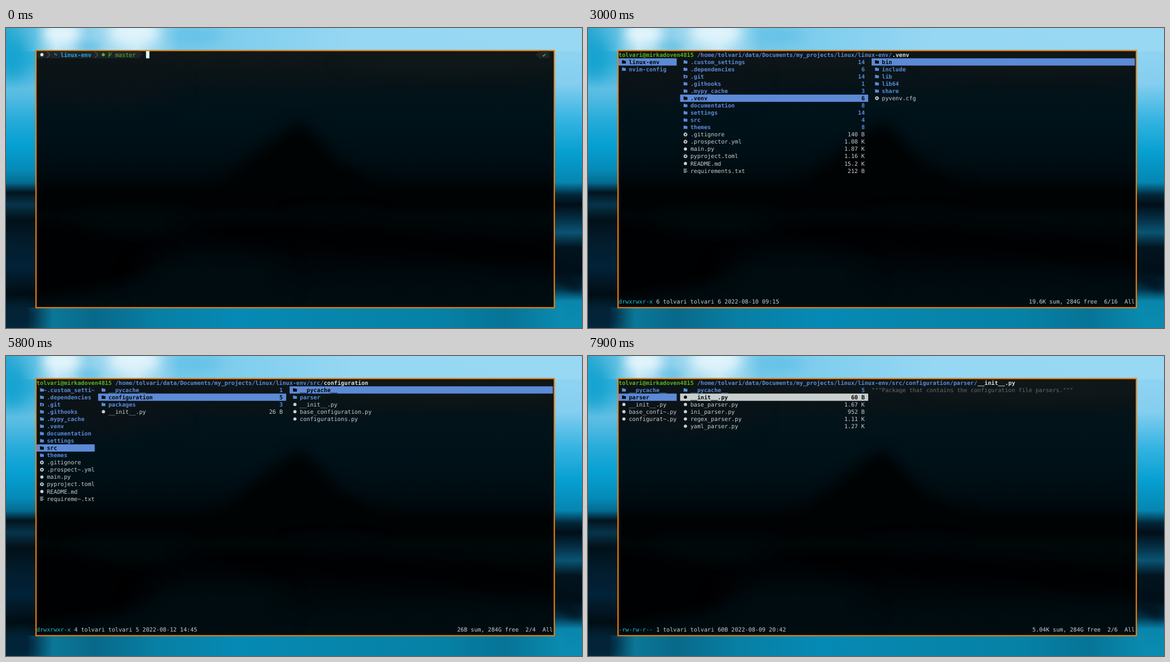
Animation, 1036 px wide and 540 px high, one loop 8000 ms. Source, as an HTML page with a canvas:

```html
<!DOCTYPE html>
<html lang="en">
<head>
<meta charset="utf-8">
<title>Terminal file manager</title>
<style>
html, body { margin: 0; width: 100%; height: 100%; overflow: hidden; background: #000; }
canvas { display: block; }
</style>
</head>
<body>
<canvas id="stage" width="1036" height="540"></canvas>
<script>
const W = 1036, H = 540, LOOP = 8000;
const LEFT = 55, TOP = 41.5, CELL = 6.15, ROW = 13.06;
const BLUE = '#5d8ad6', LIGHT = '#c9cfcf', GREEN = '#5cb31c', YELLOW = '#e9f014', RED = '#c91414',
  CYAN = '#1cc3d2', ORANGE = '#e8800f', INK = '#000507', SEGMENT = '#1d2527';
const USER = 'tolvari', HOST = 'mirkadoven4815';
const HOME = `/home/${USER}/data/Documents/my_projects/linux/linux-env/`;

const ctx = document.getElementById('stage').getContext('2d');
const colX = col => LEFT + col * CELL;
const rowY = row => TOP + row * ROW;

// ---- Blurred wallpaper and the translucent window, painted once ----
function paintBackdrop() {
  const canvas = document.createElement('canvas');
  canvas.width = W;
  canvas.height = H;
  const g = canvas.getContext('2d');
  const fade = (x, y, w, h, stops, across) => {
    const grad = across ? g.createLinearGradient(x, 0, x + w, 0) : g.createLinearGradient(0, y, 0, y + h);
    stops.split(' ').forEach(s => {
      const [at, color] = s.split(':');
      grad.addColorStop((at - (across ? x : y)) / (across ? w : h), color);
    });
    g.fillStyle = grad;
    g.fillRect(x, y, w, h);
  };
  const blob = (x, y, rx, ry, color, blur, turn = 0) => {
    g.filter = `blur(${blur}px)`;
    g.fillStyle = color;
    g.beginPath();
    g.ellipse(x, y, rx, ry, turn, 0, 7);
    g.fill();
    g.filter = 'none';
  };
  const shape = (points, color, blur) => {
    g.filter = `blur(${blur}px)`;
    g.fillStyle = color;
    g.beginPath();
    points.forEach(p => g.lineTo(...p));
    g.fill();
    g.filter = 'none';
  };

  fade(0, 0, 518, H, '0:#45b5dc 60:#36b0da 110:#62c0e5 165:#27abd9 210:#06a0d2 255:#058bb8 278:#046c92 296:#02141f 318:#06344a 345:#021019 385:#021c2c 430:#022238 480:#010d13 505:#02202f 540:#032c42');
  fade(518, 0, 518, H, '0:#98d7f2 100:#84cef0 165:#35b4e2 225:#069fd0 278:#0586b1 300:#02273a 318:#010e17 342:#042d42 368:#0a5473 395:#02141f 440:#010f19 470:#02344c 492:#0a86ac 540:#0a8cb2');
  fade(0, 0, W, 42, '0:#2ba9d3 50:#5fc0e2 90:#c4e8f6 150:#8fd1ec 235:#c4e8f6 310:#74c8ea 420:#80ceee 620:#96d7f3 1036:#98d8f3', true);
  blob(12, 55, 28, 40, '#16a3d0', 14);
  blob(100, 10, 32, 17, '#e2f4fb', 9);
  blob(230, 8, 45, 22, '#dff3fb', 10);
  blob(150, 34, 22, 9, '#66c1e3', 8);
  blob(345, 14, 45, 10, '#5fc0e6', 10);
  fade(40, 503, 960, 37, '40:#04364f 85:#0b7798 160:#08698a 270:#087fa4 420:#058ab5 600:#0785ab 780:#0681a6 900:#067496 1000:#0a8bb0', true);
  blob(20, 520, 34, 22, '#032338', 12);
  blob(1010, 455, 30, 10, '#01121d', 8, .5);

  g.save();
  g.beginPath();
  g.rect(54, 41, 932, 462);
  g.clip();
  fade(54, 41, 932, 462, '41:#101719 75:#0b1417 120:#03131a 175:#001219 235:#000e14 270:#00090d 292:#000304 318:#000304 340:#00080a 390:#000406 420:#000609 465:#000b0f 503:#020d11');
  blob(170, 100, 130, 32, '#0c1317', 22);
  blob(800, 60, 200, 16, '#10181a', 14);
  shape([[370, 292], [430, 240], [500, 185], [528, 168], [555, 190], [600, 240], [690, 292]], '#000304', 12);
  blob(230, 345, 120, 20, '#00090b', 12);
  blob(590, 333, 90, 12, '#00070a', 9);
  shape([[300, 350], [500, 348], [990, 390], [990, 428], [700, 405], [400, 378]], '#000102', 10);
  shape([[40, 340], [110, 355], [300, 415], [280, 435], [170, 470], [40, 490]], '#000102', 12);
  blob(370, 450, 130, 38, '#000d11', 22);
  g.restore();

  g.strokeStyle = ORANGE;
  g.lineWidth = 2.2;
  g.strokeRect(54, 40.6, 932.2, 462.8);
  return canvas;
}

// ---- Text grid helpers ----
function text(str, col, row, color, bold) {
  ctx.font = `${bold ? 'bold ' : ''}${CELL / 0.60205}px "DejaVu Sans Mono", monospace`;
  ctx.fillStyle = color;
  ctx.fillText(str, colX(col), rowY(row) + 10.1);
}

function bar(from, to, row, color) {
  ctx.fillStyle = color;
  ctx.fillRect(colX(from), rowY(row), (to - from) * CELL, ROW);
}

function dot(x, y, r, color) {
  ctx.fillStyle = color;
  ctx.beginPath();
  ctx.arc(x, y, r, 0, 7);
  ctx.fill();
}

function line(points, color, width = 1) {
  ctx.strokeStyle = color;
  ctx.lineWidth = width;
  ctx.beginPath();
  points.forEach(p => ctx.lineTo(...p));
  ctx.stroke();
}

function triangle(points, color) {
  ctx.fillStyle = color;
  ctx.beginPath();
  points.forEach(p => ctx.lineTo(...p));
  ctx.fill();
}

// ---- Icons, centred on (x, y) ----
const icons = {
  folder(x, y, color) {
    ctx.fillStyle = color;
    ctx.fillRect(x - 3.3, y - 2.9, 3.2, 2);
    ctx.fillRect(x - 3.3, y - 2, 6.8, 5);
  },
  repo(x, y, color) {
    icons.folder(x, y, color);
    dot(x + .2, y + .5, 1.2, INK);
  },
  gear(x, y, color) {
    ctx.strokeStyle = color;
    for (const [r, width, dash] of [[2.1, 1.7, []], [3.1, 1.1, [1.4, 1.03]]]) {
      ctx.lineWidth = width;
      ctx.setLineDash(dash);
      ctx.beginPath();
      ctx.arc(x, y, r, 0, 2 * Math.PI);
      ctx.stroke();
    }
    ctx.setLineDash([]);
  },
  disc(x, y, color) {
    dot(x, y, 2.9, color);
  },
  lines(x, y, color) {
    [6, 4.5, 7, 5].forEach((w, i) => line([[x - 3.2, y - 3 + i * 2], [x - 3.2 + w, y - 3 + i * 2]], color));
  },
  picture(x, y, color) {
    ctx.strokeStyle = color;
    ctx.lineWidth = 1;
    ctx.strokeRect(x - 2.8, y - 2.6, 4.6, 3.4);
    line([[x - 1, y + 2.6], [x + 3.2, y + 2.6], [x + 3.2, y - .6]], color);
  },
  shell(x, y, color) {
    ctx.fillStyle = color;
    ctx.fillRect(x - 3.3, y - 3, 6.8, 6);
    line([[x - 2, y - 1.3], [x - .7, y], [x - 2, y + 1.3]], INK, .8);
  },
  stack(x, y, color) {
    ctx.fillStyle = color;
    ctx.fillRect(x - 3.3, y - 3.3, 6.6, 1.2);
    ctx.fillRect(x - 3.3, y - 1.6, 6.6, 4.8);
  }
};

const byExtension = { py: 'disc', pyc: 'disc', md: 'disc', txt: 'lines', png: 'picture', gif: 'picture', sh: 'shell', deb: 'stack' };
const colorOf = { folder: BLUE, repo: BLUE, picture: YELLOW, shell: GREEN, stack: RED };

// ---- Directory listings: "name/=count" for folders, "name=size" for files ----
const listing = str => str.split(',').map(item => {
  const [raw, size = ''] = item.split('=');
  const dir = raw.endsWith('/'), name = raw.replace('/', '');
  const icon = name === '.git' ? 'repo' : dir ? 'folder' : byExtension[name.split('.').pop()] || 'gear';
  return { name, dir, size, icon, color: colorOf[icon] || LIGHT, bold: dir || icon === 'shell' };
});
const compiled = names => listing(names.split(',').map(n => n + '.cpython-38.pyc').join());

const projects = listing('linux-env/,nvim-config/');
const root = listing('.custom_settings/=14,.dependencies/=6,.git/=14,.githooks/=1,.mypy_cache/=3,.venv/=6,documentation/=8,settings/=14,src/=4,themes/=8,.gitignore=140 B,.prospector.yml=1.08 K,main.py=1.87 K,pyproject.toml=1.16 K,README.md=15.2 K,requirements.txt=212 B');
const src = listing('__pycache__/=1,configuration/=5,packages/=3,__init__.py=26 B');
const config = listing('__pycache__/=3,parser/=6,__init__.py=58 B,base_configuration.py=1.21 K,configurations.py=2.79 K');
const parser = listing('__pycache__/=5,__init__.py=60 B,base_parser.py=1.67 K,ini_parser.py=952 B,regex_parser.py=1.11 K,yaml_parser.py=1.27 K');
const settings = listing('bat/,dunst/,fonts/,fzf/,git/,i3/,nvim/,p10k/,picom/,ranger/,rofi/,tmux/,vim/,zsh/');

const inRoot = { path: '', list: root, parent: projects, at: 0, sum: '19.6K' };
const inSrc = { path: 'src/', list: src, parent: root, at: 8, sum: '26B' };
const inConfig = { path: 'src/configuration/', list: config, parent: src, at: 1, sum: '4.06K' };
const inParser = { path: 'src/configuration/parser/', list: parser, parent: config, at: 1, sum: '5.04K' };

// start, folder, selected row, hard links, date, preview
const views = [
  [1400, inRoot, 0, 16, '2022-08-19 21:02', []],
  [1500, inRoot, 0, 16, '2022-08-19 21:02', settings],
  [2300, inRoot, 1, 6, '2022-08-13 00:31', listing('albert/,fonts/,logs/,powerlevel10k/,finder.sh,vscode-latest.deb')],
  [3000, inRoot, 5, 6, '2022-08-10 09:15', listing('bin/,include/,lib/,lib64/,share/,pyvenv.cfg')],
  [3900, inRoot, 6, 3, '2022-08-19 21:02', listing('themes/,fzf_preview.gif,i3.png,i3lock.gif,p10k_truncate_path.png,themes.gif,tty-clock.gif,vscode.png')],
  [4000, inRoot, 7, 16, '2022-08-19 20:58', settings],
  [4800, inRoot, 8, 5, '2022-08-12 14:45', src],
  [4900, inSrc, 0, 2, '2022-08-18 11:05', compiled('__init__')],
  [5800, inSrc, 1, 4, '2022-08-12 14:45', config],
  [6200, inConfig, 0, 2, '2022-08-18 11:05', compiled('__init__,base_configuration,configurations')],
  [6700, inConfig, 1, 3, '2022-08-12 14:45', parser],
  [6900, inParser, 0, 2, '2022-08-18 11:05', compiled('__init__,base_parser,ini_parser,regex_parser,yaml_parser')],
  [7900, inParser, 1, 1, '2022-08-09 20:42', '"""Package that contains the configuration file parsers."""']
];

function shorten(item, width) {
  if (item.name.length <= width) return item.name;
  const ext = item.dir ? '' : item.name.slice(item.name.lastIndexOf('.'));
  return item.name.slice(0, width - 1 - ext.length) + '~' + ext;
}

function drawList(list, from, to, selected, { width = 60, sizes = false, boldFile = false } = {}) {
  list.forEach((item, i) => {
    const row = i + 1, picked = i === selected;
    const color = picked ? INK : item.color, bold = item.bold || (picked && boldFile);
    if (picked) bar(from, to, row, item.color);
    icons[item.icon](colX(from + 1) + 3.4, rowY(row) + 6.5, color);
    if (item.dir && item.name.length > width) text('~', from + 2, row, color, bold);
    text(shorten(item, width), from + 3, row, color, bold);
    if (sizes) text(item.size, to - 1 - item.size.length, row, color, bold);
  });
}

function drawManager([, folder, selected, links, date, preview]) {
  const item = folder.list[selected], path = HOME + folder.path, who = `${USER}@${HOST}`;
  text(who, 0, 0, GREEN, true);
  text(path, who.length + 1, 0, BLUE, true);
  text(item.name, who.length + 1 + path.length, 0, '#dce1e1', true);

  drawList(folder.parent, 0, 17, folder.at, { width: 14, boldFile: true });
  drawList(folder.list, 18, 73, selected, { sizes: true, boldFile: true });
  if (typeof preview === 'string') text(preview, 74, 1, '#666b6c');
  else drawList(preview, 74, 151, 0);

  text(item.dir ? 'drwxrwxr-x' : '-rw-rw-r--', 0, 34, CYAN);
  text(`${links} ${USER} ${USER} ${item.size.replace(' ', '')} ${date}`, 11, 34, LIGHT);
  const info = `${folder.sum} sum, 284G free  ${selected + 1}/${folder.list.length}  All`;
  text(info, 151 - info.length, 34, LIGHT);
}

function drawPrompt(typed) {
  const top = rowY(0), mid = top + 6.5, bottom = top + ROW;
  bar(0, 30, 0, SEGMENT);
  triangle([[colX(30), top], [colX(31), mid], [colX(30), bottom]], SEGMENT);
  bar(147, 150, 0, SEGMENT);
  triangle([[colX(147), top], [colX(146), mid], [colX(147), bottom]], SEGMENT);

  dot(colX(1) + 3.4, mid, 2.9, '#dde3e3');
  for (const col of [3, 17]) {
    line([[colX(col) + .5, top + 1], [colX(col + 1) - .6, mid], [colX(col) + .5, bottom - 1]], '#6d7576');
  }
  const x = colX(5);
  line([[x + .6, mid - 2], [x + 3, mid - 2], [x + 4, mid - 1], [x + 6, mid - 1]], '#1d9ad0');
  line([[x + 1, mid], [x + 4, mid], [x + 5, mid + 1.5], [x + 6.5, mid + 1.5]], '#1d9ad0');
  text('linux-env', 7, 0, '#22a7ea', true);

  dot(colX(19) + 3.2, mid, 2.8, GREEN);
  const b = colX(21);
  line([[b + 1.2, mid - 4.5], [b + 1.2, mid + 4.5]], GREEN, 1.1);
  line([[b + 1.2, mid + 2], [b + 4.7, mid - .5], [b + 4.7, mid - 3.5]], GREEN, 1.1);
  text('master', 23, 0, GREEN);
  text('✔', 148, 0, '#5fc414');

  text(typed, 32, 0, LIGHT);
  bar(32 + typed.length, 33 + typed.length, 0, '#daf4fb');
}

const backdrop = paintBackdrop();
ctx.textRendering = 'geometricPrecision';

function frame() {
  const t = performance.now() % LOOP;
  ctx.drawImage(backdrop, 0, 0);
  const view = views.filter(v => v[0] <= t).pop();
  if (view) drawManager(view);
  else drawPrompt('ranger'.slice(0, Math.max(0, Math.floor((t - 600) / 100))));
  requestAnimationFrame(frame);
}
frame();
</script>
</body>
</html>
```
